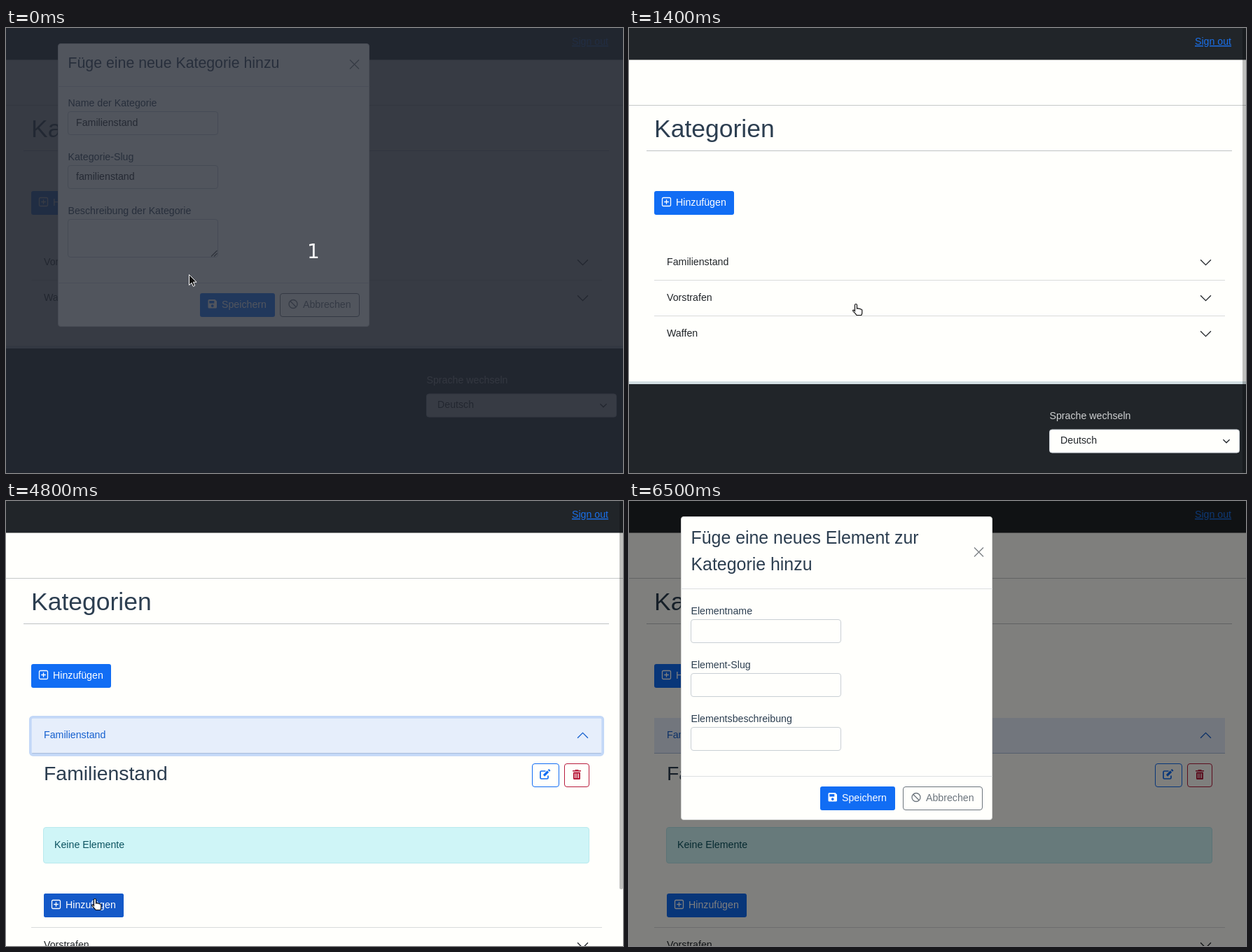
Write an HTML page that moves like this. It is 881x636 px and loops after 6.8 s.

```html
<!DOCTYPE html>
<html lang="de">
<head>
<meta charset="utf-8">
<title>Kategorien</title>
<style>
html, body { margin: 0; width: 100%; height: 100%; overflow: hidden; background: #212529; }
svg { display: block; font-family: "Liberation Sans", Arial, sans-serif; }
.icon { fill: none; stroke-width: 1.3; }
</style>
</head>
<body>
<svg id="stage" width="881" height="636" viewBox="0 0 881 636"></svg>
<script>
const PAPER = '#fffffc', INK = '#2c3e50', DARK = '#212529', BLUE = '#116df4', LINK = '#1560cf',
  RED = '#b81c3c', GREY = '#6c757d', LINE = '#d9dbdb';
const LOOP = 6800, STEP = 100, BASE = 14.2, ROW = 51, PANEL = 249;

// Markup helpers
const text = (x, y, str, size = BASE, fill = INK, more = '') =>
  `<text x="${x}" y="${y}" font-size="${size}" fill="${fill}" ${more}>${str}</text>`;
const rect = (x, y, w, h, fill, more = '') =>
  `<rect x="${x}" y="${y}" width="${w}" height="${h}" fill="${fill}" ${more}/>`;
const box = (x, y, w, h, fill, stroke, more = '') =>
  rect(x + .5, y + .5, w - 1, h - 1, fill, `stroke="${stroke}" rx="3.5" ${more}`);
const rule = (x, y, w, color, more) => rect(x, y, w, 1, color, more);
const at = (x, y, body) => `<g transform="translate(${x} ${y})">${body}</g>`;
const chevron = (x, y, id = '', w = 7.4) =>
  at(x, y, `<path id="${id}" class="icon" stroke="${DARK}" d="M${-w} ${-w / 2}L0 ${w / 2}L${w} ${-w / 2}"/>`);
const cross = (x, y) =>
  at(x, y, '<path class="icon" stroke="#7c8084" d="M-6.5-6.5L6.5 6.5M6.5-6.5L-6.5 6.5"/>');

const plusIcon = at(17.5, 15.5, '<rect class="icon" stroke="#fff" x="-6" y="-6" width="12" height="12" rx="1.5"/>' +
  '<path class="icon" stroke="#fff" d="M0-3.3V3.3M-3.3 0H3.3"/>');
const diskIcon = '<path fill="#fff" fill-rule="evenodd" d="M13 9h8.5l2.5 2.5V20q0 1.5-1.5 1.5H13q-1.5 0-1.5-1.5V10.5q0-1.5 1.5-1.5zM13.3 11v3.4h7V11zM17.7 16.2a1.9 1.9 0 1 0 .1 0z"/>';
const banIcon = at(19, 15.5, `<g class="icon" stroke="${GREY}"><circle r="6"/><path d="M-4.2-4.2L4.2 4.2"/></g>`);
const pencilIcon = at(762, 383, `<g id="pencil" stroke="${BLUE}" fill="none">
  <path stroke-width="1.7" d="M8.5 3H2.5Q1 3 1 4.500v8q0 1.500 1.500 1.500h8q1.500 0 1.500-1.500V9.500"/>
  <path stroke-width="3.2" d="M6 9.500L12 3.500M12.800 2.700l1.600-1.600"/></g>`);
const trashIcon = at(809, 384, rect(0, 1, 12, 1.5, RED) + rect(3.5, 0, 5, 2, RED) + rect(1, 3.5, 10, 10.5, RED, 'rx="1.2"') +
  [3, 5.5, 8].map(x => rect(x, 5.5, 1, 6.5, PAPER)).join(''));

const button = (id, x, y, w, label, icon) => at(x, y,
  box(-2, -2, w + 4, 38, 'none', '#82b1f8', `id="${id}Ring" stroke-width="4" opacity="0"`) +
  rect(0, 0, w, 34, BLUE, 'rx="3"') +
  rect(0, 0, w, 34, '#1459c8', `id="${id}Dark" rx="3" opacity="0"`) +
  icon + text(31, 21, label, BASE, '#fff'));

// Dialogs
const field = (y, label, h = 34) =>
  text(88.5, y - 7, label) + box(88, y, 215, h, PAPER, '#c9cfd4');
const dialog = (id, h, head, saveX, body) => {
  const foot = 22 + h - 63;
  return `<g id="${id}">` + box(74, 22, 445, h, PAPER, '#d4d5d3') +
    rule(74, head, 445, '#dcdfe1') + rule(74, foot, 445, '#dcdfe1') + body +
    button(id + 'Save', saveX, foot + 15, 107, 'Speichern', diskIcon) +
    at(391, foot + 15, box(0, 0, 114, 34, 'none', GREY) + banIcon + text(33, 21, 'Abbrechen', BASE, GREY)) + '</g>';
};

const categoryDialog = dialog('category', 405, 83, 277,
  text(88.5, 57, 'Füge eine neue Kategorie hinzu', 21.3) + cross(497.5, 52) +
  field(119, 'Name der Kategorie') + field(196, 'Kategorie-Slug') + field(273, 'Beschreibung der Kategorie', 55) +
  '<path class="icon" stroke="#555" d="M293 326.5l8.500-8.500M297 326.500l4.500-4.500"/>' +
  `<g id="typed">${text(100, 140, 'Familienstand', BASE, DARK)}${text(100, 217, 'familienstand', BASE, DARK)}</g>`);

const elementDialog = dialog('element', 434, 125, 273,
  text(88.5, 61, 'Füge eine neues Element zur', 24.9) + text(88.5, 98.5, 'Kategorie hinzu', 24.9) + cross(499.5, 73) +
  field(169, 'Elementname') + field(246, 'Element-Slug') + field(323, 'Elementsbeschreibung'));

// Page
const row = (y, label, id = '') =>
  text(54, y + 29, label, BASE, DARK, `id="${id}Text"`) + chevron(823.5, y + 25, id + 'Chevron');

const openRow =
  rect(36, 310, 815, 50, '#e6eefb', 'id="active"') + rule(36, 360, 815, LINE) +
  rule(36, 360, 815, '#a9bddc', 'id="edge"') + row(310, 'Familienstand', 'open') +
  box(34.3, 308.3, 818.4, 55, 'none', '#c3d8f7', 'id="openRing" stroke-width="3.7"');

const panel =
  text(54, 399, 'Familienstand', 28.4) +
  box(751, 375, 39, 34, PAPER, BLUE, 'id="edit"') + pencilIcon +
  box(797, 375, 36, 34, PAPER, RED) + trashIcon +
  box(53, 466, 780, 52, '#cff5f7', '#b8eaee') + text(69, 496, 'Keine Elemente', BASE, '#0b5360') +
  button('item', 54, 561, 114, 'Hinzufügen', plusIcon);

const footer =
  rect(0, 505, 881, 4, '#d3dfe3') + rect(0, 509, 881, 400, DARK) +
  text(600.5, 559, 'Sprache wechseln', BASE, '#cfd1d2') +
  box(600, 573.5, 272, 34, PAPER, '#ced4da') + text(616, 594, 'Deutsch', BASE, DARK) +
  chevron(853, 590.5, '', 4.6);

const pointer =
  `<path id="arrow" fill="#111" stroke="#fff" d="M.5.5V15.5L4 12.2L6.300 17.300L8.700 16.200L6.500 11.200H11z"/>
   <path id="hand" fill="#fff" stroke="#111" stroke-width="1.2" d="M-1.5 1a1.500 1.500 0 0 1 3 0V6q1.500-1 2.700.3q1.600-.6 2.500.7q2-.2 2.100 1.600V12q0 1.800-1 3.500H1Q-.5 13-3.500 10.400q-1.600-1.700-.2-2.300q1.200-.3 2.200 1.200z"/>`;

const fullRect = (fill, more) => rect(0, 0, 881, 636, fill, more);
stage.innerHTML =
  `<clipPath id="clip"><rect id="clipBox" x="30" y="361" width="830" height="0"/></clipPath>` +
  fullRect(PAPER) + rect(0, 0, 881, 45.5, DARK) +
  text(808, 24, 'Sign out', BASE, '#1a70ea', 'text-decoration="underline"') +
  rule(0, 110, 881, '#c6c8c8') + text(36, 156, 'Kategorien', 35.5) + rule(25, 175, 836, '#bfc3c5') +
  button('add', 36, 233, 114, 'Hinzufügen', plusIcon) +
  `<g id="first">${openRow}</g><g clip-path="url(#clip)">${panel}</g>` +
  `<g id="rest">${rule(36, 360, 815, LINE, 'id="restEdge"')}${row(361, 'Vorstrafen')}${rule(36, 411, 815, LINE)}${row(412, 'Waffen')}${footer}</g>` +
  rect(876, 0, 5, 636, '#000', 'id="bar" rx="2.5" opacity=".25"') +
  fullRect('#000', 'id="shade"') + categoryDialog + elementDialog +
  `<g id="countdown">${fullRect('#262b36', 'opacity=".8"')}` +
  text(439, 328.5, '1', 28, '#fff', 'text-anchor="middle" font-family="DejaVu Sans, sans-serif"') + '</g>' +
  `<g id="pointer">${pointer}</g>`;

// Motion helpers
const ramp = (t, start, length) => Math.min(1, Math.max(0, (t - start) / length));
const easeOut = p => 1 - (1 - p) ** 2;
const smooth = p => p * p * (3 - 2 * p);
const within = (t, a, b) => t >= a && t < b;

const set = (id, name, value) => document.getElementById(id).setAttribute(name, value);
const fade = (id, value) => set(id, 'opacity', value);
const show = (id, on) => set(id, 'display', on ? 'inline' : 'none');

// Pointer moves: start, end, x, y
const moves = [
  [0, 700, 324, 395],
  [1900, 2300, 149, 331],
  [3000, 3700, 319, 497],
  [3700, 4100, 768, 388],
  [4200, 4800, 127, 569],
  [5600, 5700, 154, 540],
  [5800, 6300, 96, 14]
];

function pointerAt(t) {
  let x = 261, y = 352;
  for (const [start, end, toX, toY] of moves) {
    const p = smooth(ramp(t, start, end - start));
    x += (toX - x) * p;
    y += (toY - y) * p;
  }
  return `${x} ${y}`;
}

// Dialogs drop in from 50 px above while they fade
function place(id, drop, alpha) {
  set(id, 'transform', `translate(0 ${50 * (drop - 1)})`);
  fade(id, alpha);
}

function draw(t) {
  const saved = t >= 900;
  const open = easeOut(ramp(t, 2500, 350));
  const color = open ? LINK : DARK;

  // Accordion
  const headFocus = ramp(t, 2450, 150) - ramp(t, 4900, 100);
  show('first', saved);
  set('rest', 'transform', `translate(0 ${saved ? PANEL * open : -ROW})`);
  set('clipBox', 'height', PANEL * open);
  show('restEdge', open > 0);
  fade('active', open);
  fade('edge', Math.max(open, headFocus));
  fade('openRing', headFocus);
  set('openText', 'fill', color);
  set('openChevron', 'stroke', color);
  set('openChevron', 'transform', `rotate(${-180 * open})`);
  show('bar', within(t, 1400, 5000));
  set('bar', 'height', 636 - 81 * open);

  // Buttons
  const addFocus = ramp(t, 1450, 150) - ramp(t, 2450, 150);
  const editHover = within(t, 4100, 4300);
  fade('addRing', addFocus);
  fade('addDark', addFocus);
  fade('categorySaveDark', +(t >= 600));
  fade('categorySaveRing', +(t >= 800));
  fade('itemDark', +within(t, 4800, 5700));
  fade('itemRing', +within(t, 5000, 5300));
  set('edit', 'fill', editHover ? BLUE : PAPER);
  set('pencil', 'stroke', editHover ? PAPER : BLUE);

  // Dialogs
  fade('shade', .5 * (1 - ramp(t, 1250, 150) + ramp(t, 4950, 150)));
  place('category', 1 - easeOut(ramp(t, 1091, 300)), 1 - ramp(t, 1091, 200));
  place('element', easeOut(ramp(t, 5075, 300)), ramp(t, 5075, 250));
  show('typed', !saved);
  fade('countdown', 1 - ramp(t, 0, 500));

  // Pointer
  const hand = within(t, 600, 3200) || editHover || within(t, 4800, 5100);
  show('hand', hand);
  show('arrow', !hand);
  show('pointer', t < 6500);
  set('pointer', 'transform', `translate(${pointerAt(t)})`);
}

function frame() {
  draw(Math.floor(performance.now() % LOOP / STEP) * STEP);
  requestAnimationFrame(frame);
}
frame();
</script>
</body>
</html>
```
